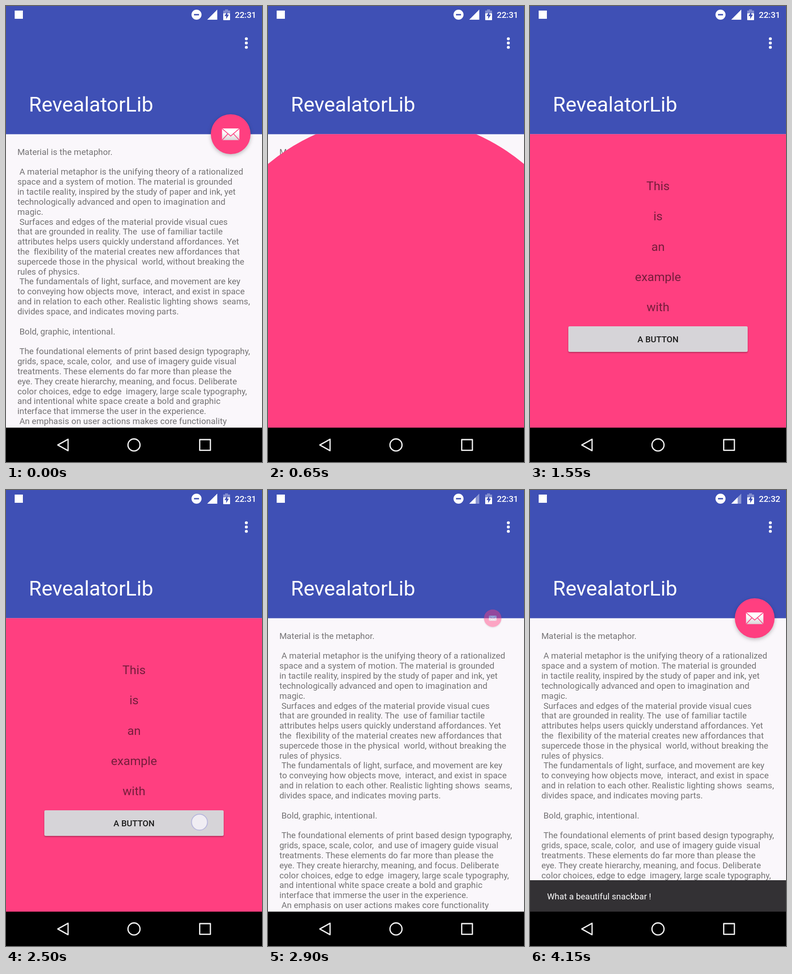
An HTML page that plays this animation: 561 by 998 pixels, repeating every 4.2 s.

```html
<!DOCTYPE html>
<html lang="en">
<head>
<meta charset="utf-8">
<title>Reveal animation</title>
<style>
  html, body { margin: 0; width: 100%; height: 100%; overflow: hidden; background: #000; }
  svg { display: block; width: 561px; height: 998px; font: 18.7px Roboto, sans-serif; }
  text { white-space: pre; }
  .muted { fill: #000; fill-opacity: .54; }
  .medium { font-weight: 500; }
  #fabDisc { filter: drop-shadow(0 3px 4px rgba(0, 0, 0, .25)); }
  #button rect { filter: drop-shadow(0 2px 1.5px rgba(0, 0, 0, .3)); }
</style>
</head>
<body>
<svg viewBox="0 0 561 998">
  <defs>
    <clipPath id="revealClip"><circle id="reveal" cx="280.5" cy="680" r="0"/></clipPath>
    <clipPath id="contentClip"><rect y="280.6" width="561" height="642.4"/></clipPath>
    <linearGradient id="paper" x2="0" y2="1">
      <stop offset=".3" stop-color="#fff"/><stop offset="1" stop-color="#d9d6d8"/>
    </linearGradient>
  </defs>

  <rect width="561" height="998" fill="#faf7fb"/>
  <g id="article" class="muted" clip-path="url(#contentClip)"></g>

  <rect width="561" height="280.6" fill="#3f50b5"/>
  <text id="title" x="49.9" y="231" fill="#fff">RevealatorLib</text>
  <g fill="#fff">
    <rect x="19" y="10" width="18" height="18"/>
    <circle cx="417.5" cy="19" r="11"/>
    <rect x="412" y="17.5" width="11" height="3" fill="#3f50b5"/>
    <path d="M441 30 463 8V30Z" opacity=".4"/>
    <path id="signal"/>
    <path d="M480 7.500h6.500v2.500h4.500v6h-15v-6h4Z" opacity=".35"/>
    <rect x="476" y="16" width="15" height="15" rx="1"/>
    <path d="M485 12.500 478.800 22h3.700v6.500L488.500 19h-3.500Z" fill="#3f50b5"/>
    <text id="clock" class="medium" x="501.5" y="26">22:31</text>
    <circle cx="526.7" cy="71.7" r="3.2"/>
    <circle cx="526.7" cy="81" r="3.2"/>
    <circle cx="526.7" cy="90.4" r="3.2"/>
  </g>

  <g clip-path="url(#contentClip)">
    <g clip-path="url(#revealClip)">
      <rect y="280" width="561" height="643" fill="#ff3f80"/>
      <g id="words" class="muted" font-size="26.7" text-anchor="middle"></g>
      <g id="button">
        <rect x="-196.5" y="-28" width="393" height="56" rx="3" fill="#d6d4d8"/>
        <text class="medium" y="7" text-anchor="middle" fill="#1b1b1b">A BUTTON</text>
      </g>
    </g>
    <g id="snackbar">
      <rect y="854" width="561" height="69" fill="#333134"/>
      <text id="message" x="37.4" y="896" fill="#fff">What a beautiful snackbar !</text>
    </g>
  </g>

  <g id="fab">
    <circle id="fabDisc" r="43.6" fill="#ff3f80"/>
    <rect x="-19" y="-12.5" width="38" height="25.5" rx="1.5" fill="url(#paper)"/>
    <path d="M-18.5-12 0 4 18.5-12M-18.5 12.5-6-1M18.5 12.5 6-1" fill="none" stroke="#ff3f80" stroke-width="1.6"/>
  </g>

  <circle id="touch" r="17.5" fill="#f2eff6" fill-opacity=".92" stroke="#b8b7dc" stroke-width="2"/>

  <rect y="922.8" width="561" height="76"/>
  <g fill="none" stroke="#eee" stroke-width="2.8" stroke-linejoin="round">
    <path d="M113.5 960.700 136 948.200V973.200Z"/>
    <circle cx="280.5" cy="960.7" r="13.2"/>
    <rect x="424.5" y="949" width="23.4" height="23.4"/>
  </g>
</svg>
<script>
const LOOP = 4200, STEP = 50;
const DEVICE_PIXEL = 561 / 1080;
const FAB = [492.4, 280.6], CENTER = [280.5, 680], ARC = [480, 540];
const FAB_RADIUS = 43.6, FULL_RADIUS = 488;

const article = `Material is the metaphor.

 A material metaphor is the unifying theory of a rationalized
space and a system of motion. The material is grounded
in tactile reality, inspired by the study of paper and ink, yet
technologically advanced and open to imagination and
magic.
 Surfaces and edges of the material provide visual cues
that are grounded in reality. The  use of familiar tactile
attributes helps users quickly understand affordances. Yet
the  flexibility of the material creates new affordances that
supercede those in the physical  world, without breaking the
rules of physics.
 The fundamentals of light, surface, and movement are key
to conveying how objects move,  interact, and exist in space
and in relation to each other. Realistic lighting shows  seams,
divides space, and indicates moving parts.

 Bold, graphic, intentional.

 The foundational elements of print based design typography,
grids, space, scale, color,  and use of imagery guide visual
treatments. These elements do far more than please the
eye. They create hierarchy, meaning, and focus. Deliberate
color choices, edge to edge  imagery, large scale typography,
and intentional white space create a bold and graphic
interface that immerse the user in the experience.
 An emphasis on user actions makes core functionality`;

const $ = id => document.getElementById(id);
const set = (id, attrs) => {
  for (const name in attrs) $(id).setAttribute(name, attrs[name]);
};
const progress = (t, start, duration) => Math.min(1, Math.max(0, (t - start) / duration));
const mix = (a, b, p) => a + (b - a) * p;
const decelerate = p => 1 - (1 - p) ** 2;
const smooth = p => (1 - Math.cos(Math.PI * p)) / 2;

// Cubic Bezier easing with handles (x1, 0) and (x2, 1).
const bezier = (x1, x2) => p => {
  let low = 0, high = 1;
  for (let i = 0; i < 24; i++) {
    const s = (low + high) / 2;
    const x = 3 * s * (1 - s) * ((1 - s) * x1 + s * x2) + s ** 3;
    if (x < p) low = s; else high = s;
  }
  return p <= 0 ? 0 : p >= 1 ? 1 : 3 * low ** 2 - 2 * low ** 3;
};
const slowIn = bezier(0, .2);
const fastOutSlowIn = bezier(.4, .2);

function addText(parent, content, attrs) {
  const text = document.createElementNS(parent.namespaceURI, 'text');
  for (const name in attrs) text.setAttribute(name, attrs[name]);
  text.textContent = content;
  parent.append(text);
  return text;
}

// Phone text: each glyph advance is rounded to whole device pixels, kerning is not.
const measure = document.createElement('canvas').getContext('2d');
function snapGlyphs(text, size, weight = 400) {
  measure.font = `${weight} ${size}px Roboto, sans-serif`;
  const width = s => measure.measureText(s).width;
  const chars = [...text.textContent];
  let x = +text.getAttribute('x');
  const positions = chars.map((char, i) => {
    const here = x, next = chars[i + 1] || '';
    const kerning = width(char + next) - width(char) - width(next);
    x += (Math.round(width(char)) + kerning) * DEVICE_PIXEL;
    return here.toFixed(2);
  });
  text.setAttribute('x', positions.join(' '));
  text.setAttribute('font-size', size * DEVICE_PIXEL);
}

article.split('\n').forEach((line, i) => {
  if (line) snapGlyphs(addText($('article'), line, { x: 24.9, y: 325.7 + 21.83 * i }), 36);
});
snapGlyphs($('title'), 87);
snapGlyphs($('clock'), 36, 500);
snapGlyphs($('message'), 36);

const words = ['This', 'is', 'an', 'example', 'with'].map(word =>
  addText($('words'), word, { y: 10.4 }));
const items = [...words, $('button')];

const arcPoint = p => FAB.map((from, i) =>
  (1 - p) ** 2 * from + 2 * p * (1 - p) * ARC[i] + p * p * CENTER[i]);

function draw(t) {
  const opened = t >= 460 && t < 2860;
  const radius = t < 2600
    ? mix(FAB_RADIUS, FULL_RADIUS, (t - 460) / 215)
    : mix(FULL_RADIUS, 0, progress(t, 2600, 260));
  set('reveal', { r: opened ? Math.min(radius, 600) : 0 });

  items.forEach((item, i) => {
    const scale = decelerate(progress(t, 765 + 50 * i, 500));
    const y = i < 5 ? 392.4 + 66.4 * i : 729;
    item.setAttribute('transform', `translate(280.5 ${y}) scale(${scale})`);
  });

  const shown = t < 460 ? 1 : slowIn(progress(t, 2867, 200));
  const [x, y] = t < 460 ? arcPoint(smooth(progress(t, 220, 240))) : FAB;
  set('fab', { transform: `translate(${x} ${y}) scale(${shown})`, opacity: shown });

  const slide = fastOutSlowIn(progress(t, 2900, 250));
  set('snackbar', { transform: `translate(0 ${69 * (1 - slide)})` });
  set('message', { opacity: progress(t, 2970, 180) });

  const onFab = t >= 150 && t < 250, onButton = t >= 2500 && t < 2600;
  set('touch', {
    cx: onFab ? 493 : 424,
    cy: onFab ? 288 : 727,
    visibility: onFab || onButton ? 'visible' : 'hidden'
  });

  set('signal', { d: t < 2600 ? 'M441 30 463 8V30Z' : 'M441 30 455 16V30Z' });
  $('clock').textContent = t < 4150 ? '22:31' : '22:32';
}

function tick(now) {
  draw(Math.floor(now % LOOP / STEP) * STEP);
  requestAnimationFrame(tick);
}
draw(0);
requestAnimationFrame(tick);
</script>
</body>
</html>
```
